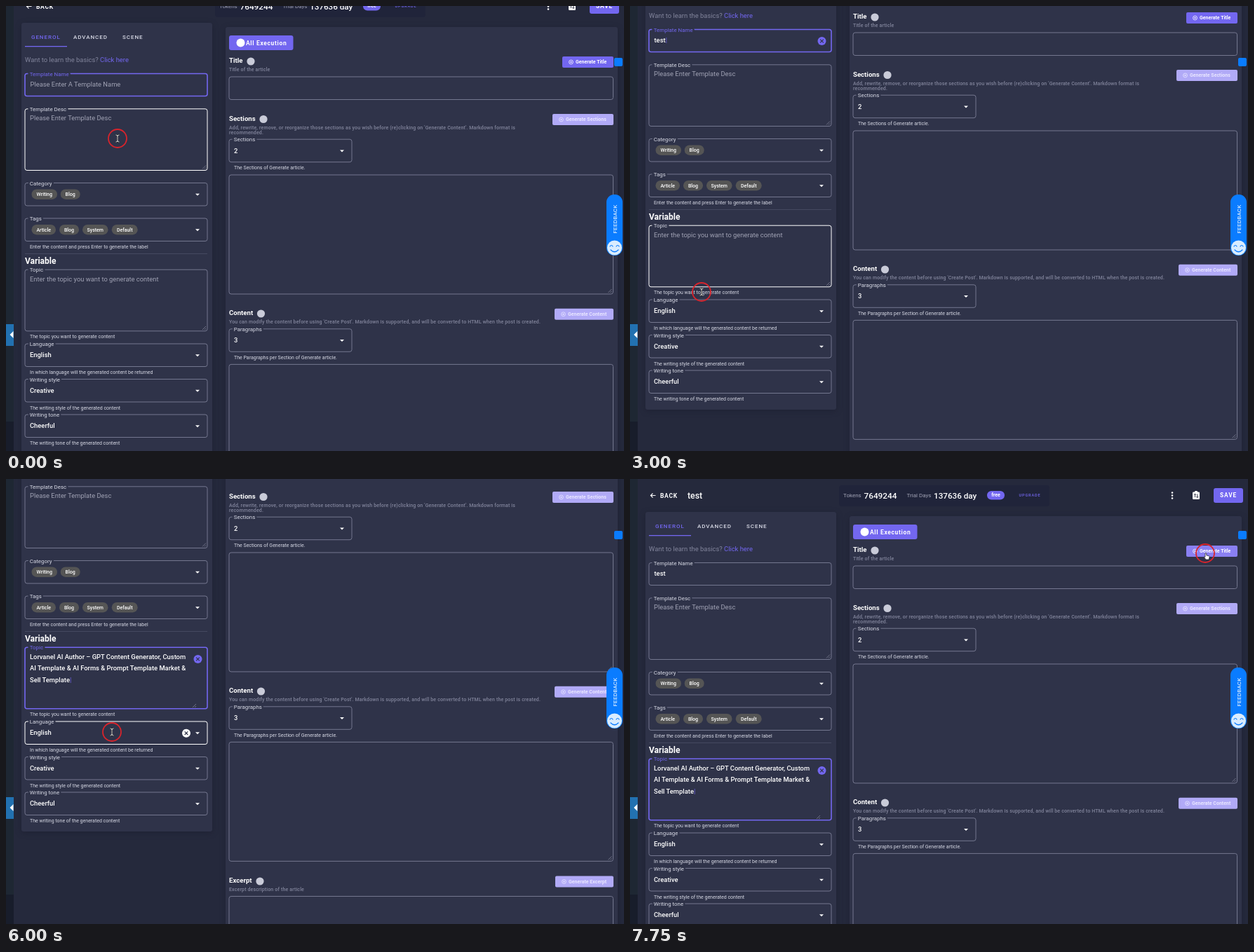
These frames come from a looping animation (881x635 px, 8000 ms). An HTML page:

```html
<!DOCTYPE html>
<html lang="en">
<head>
<meta charset="utf-8">
<title>Template editor</title>
<style>
  html, body { margin: 0; width: 100%; height: 100%; overflow: hidden; background: #25293c; }
  svg { display: block; width: 881px; height: 635px; font-family: Roboto, sans-serif; }
  text { white-space: pre; }
  .label { paint-order: stroke; stroke: #2f3349; stroke-width: 5px; }
  .panel { filter: drop-shadow(0 2px 4px #14172866); }
</style>
</head>
<body>
<svg id="stage" viewBox="0 0 881 635"></svg>
<script>
const LOOP = 8000, STEP = 250;
const PURPLE = '#7367f0', PANEL = '#2f3349', WHITE = '#fff', BORDER = '#74778f';
const MUTED = '#82859c', HINT = '#a0a2b4', PALE = '#d8dae6', BLUE = '#0a7cff';

// Rows of [time, ...values]
const SCROLL = [[0, 23], [500, 0], [2500, 0], [3000, 86], [3500, 159], [6250, 159], [6750, 117], [7250, 0]];
const POINTER = [
  [0, 159, 189], [750, 145, 134], [2000, 145, 134], [2500, 120, 330], [3000, 102, 408],
  [3750, 102, 426], [4000, 118, 280], [4500, 118, 280], [5500, 135, 400], [6000, 151, 361],
  [6750, 259, 345], [7250, 500, 240], [7750, 820, 106]
];

function track(keys, t) {
  const next = keys.findIndex(k => k[0] > t);
  if (next < 0) return keys.at(-1).slice(1);
  const a = keys[next - 1], b = keys[next], p = (t - a[0]) / (b[0] - a[0]);
  return a.slice(1).map((v, i) => v + (b[i + 1] - v) * p);
}

// y is the vertical middle of the capitals
const text = (x, y, s, size, fill = WHITE, weight = 400, spacing = 0, extra = '') =>
  `<text x="${x}" y="${y + size * .355}" font-size="${size}" fill="${fill}" font-weight="${weight}" letter-spacing="${spacing}" ${extra}>${s}</text>`;
const box = (x, y, w, h, fill, r = 0, extra = '') =>
  `<rect x="${x}" y="${y}" width="${w}" height="${h}" rx="${r}" fill="${fill}" ${extra}/>`;
const disc = (x, y, r, fill, extra = '') => `<circle cx="${x}" cy="${y}" r="${r}" fill="${fill}" ${extra}/>`;
const line = (d, stroke = WHITE, width = 1, extra = '') =>
  `<path d="${d}" fill="none" stroke="${stroke}" stroke-width="${width}" ${extra}/>`;
const arrowDown = (x, y) => `<path d="M${x - 3} ${y - 1.2}h6l-3 3z" fill="${WHITE}"/>`;
const clearIcon = (x, y, fill, cross) =>
  disc(x, y, 6, fill) + line(`M${x - 2.3} ${y - 2.3}l4.6 4.6m0 -4.6l-4.6 4.6`, cross, 1.2);
const grip = (x, y) => line(`M${x - 5} ${y}l5 -5M${x - 2} ${y}l2 -2`, '#9a9cb0', .6);
const helper = (x, y, s) => text(x, y, s, 7, PALE);
const value = (x, y, s) => text(x, y, s, 9.4, WHITE, 500);
const hint = (x, y, s) => text(x, y, s, 9.37, HINT);
const caret = `<tspan fill="${PURPLE}" font-weight="400">|</tspan>`;

function field(x, y, w, h, label = '', state = '') {
  const focused = state === 'focus';
  const stroke = focused ? PURPLE : state === 'hover' ? WHITE : BORDER;
  return box(x, y, w, h, 'none', 3, `stroke="${stroke}" stroke-width="${focused ? 1.6 : 1}"`) +
    text(x + 6.8, y + .2, label, 7.9, focused ? PURPLE : PALE, 400, 0, 'class="label"');
}

const area = (...args) => field(...args) + grip(args[0] + args[2] - 2, args[1] + args[3] - 2);
const select = (x, y, w, label, content, state) =>
  field(x, y, w, 32.5, label, state) + value(x + 7, y + 16, content) + arrowDown(x + w - 14, y + 16.5);
const chip = (x, y, w, s) => box(x, y - 7.3, w, 14.6, '#555555', 7.3) +
  text(x + w / 2, y, s, 7, WHITE, 500, 0, 'text-anchor="middle"');

function generateButton(x, y, name, fill = '#b1aaf7') {
  const ink = fill === '#b1aaf7' ? '#e9e6ff' : WHITE;
  return box(x, y - 8, 866 - x, 16, fill, 2) +
    disc(x + 12.5, y, 2.9, 'none', `stroke="${ink}" stroke-width=".8"`) + disc(x + 12.5, y, 1.1, ink) +
    text(x + 19, y, 'Generate ' + name, 7, ink, 700);
}

const heading = (y, s, iconX) => text(318, y, s, 9.6, WHITE, 700) + disc(iconX, y + 1, 5.6, '#c9cbd8');
const note = (y, s) => text(318, y, s, 7, MUTED, 500, .15);

function topBar(name) {
  return line('M36.5 23.5h-7m3 -3l-3 3l3 3', WHITE, 1.1) +
    text(43, 23.5, 'BACK', 8.5, WHITE, 700, .7) + text(82, 23.5, name, 12.3, WHITE, 500) +
    box(298, 9, 300, 30, '#20243a', 4) +
    text(304, 23.5, 'Tokens', 8, HINT) + text(333.5, 23.5, '7649244', 11.8, WHITE, 500) +
    text(394.5, 23.5, 'Trial Days', 8, HINT) + text(433, 23.5, '137636 day', 11.7, WHITE, 500) +
    box(509, 17, 25, 12.5, PURPLE, 6.2) + text(521.5, 23, 'free', 7, WHITE, 700, 0, 'text-anchor="middle"') +
    text(554.5, 23.5, 'UPGRADE', 5.6, PURPLE, 500, .85) +
    [19.5, 23.5, 27.5].map(y => disc(773, y, 1.3, WHITE)).join('') +
    box(802, 18.5, 10, 10.5, WHITE, 1.2) + box(805, 17, 4, 3, WHITE, 1) +
    line('M805.5 26v-5m-1.5 1.5l1.5 -1.5l1.5 1.5M808.8 21.5v5m-1.5 -1.5l1.5 1.5l1.5 -1.5', '#25293c', .9) +
    box(832, 13, 42, 21, PURPLE, 3) + text(841, 23.5, 'SAVE', 8.3, WHITE, 700, .9);
}

function leftPanel(t, name) {
  const filled = t >= 4500, nameFocus = t < 4000;
  const topicState = nameFocus ? (t >= 2750 && t < 3500 ? 'hover' : '') : 'focus';
  const languageHover = t >= 6000 && t < 7000;
  const topic = ['Lorvanel AI Author – GPT Content Generator, Custom',
    'AI Template &amp; AI Forms &amp; Prompt Template Market &amp;', 'Sell Template' + caret];
  return box(22, 47, 272, 615, PANEL, 3, 'class="panel"') +
    text(36, 67, 'GENEROL', 8, PURPLE, 500, .95) + text(96, 67, 'ADVANCED', 8, PALE, 500, .95) +
    text(166, 67, 'SCENE', 8, PALE, 500, .95) + box(27, 80, 60, 1.3, PURPLE) +
    text(27, 100, `Want to learn the basics? <tspan fill="${PURPLE}">Click here</tspan>`, 9.38, MUTED) +

    field(27, 119.5, 260, 32, 'Template Name', nameFocus ? 'focus' : '') +
    (name ? value(34.5, 135, name + (nameFocus ? caret : '')) : hint(34.5, 135, 'Please Enter A Template Name')) +
    (name && nameFocus ? clearIcon(273.5, 136, PURPLE, PANEL) : '') +
    area(27, 169.8, 260, 87.7, 'Template Desc', t < 500 ? 'hover' : '') + hint(34, 183, 'Please Enter Template Desc') +

    select(27, 275.5, 260, 'Category', '') + chip(36.5, 291.7, 36.5, 'Writing') + chip(77.7, 291.7, 28, 'Blog') +
    select(27, 326, 260, 'Tags', '') + chip(36.5, 342.2, 34.5, 'Article') + chip(76, 342.2, 28, 'Blog') +
    chip(109, 342.2, 36.5, 'System') + chip(150.7, 342.2, 37, 'Default') +
    helper(34, 366.7, 'Enter the content and press Enter to generate the label') +
    box(27, 376, 260, .8, '#4b4f66') + text(27, 386.5, 'Variable', 12, WHITE, 700) +

    field(27, 399.2, 260, 87.6, 'Topic', topicState) + grip(filled ? 271 : 285, 485) +
    (filled ? topic.map((s, i) => value(34, 412.5 + i * 16.4, s)).join('') + clearIcon(273.5, 416, PURPLE, PANEL)
      : hint(34, 412.5, 'Enter the topic you want to generate content')) +
    (!filled && !nameFocus ? box(34, 407, .9, 11, PURPLE) : '') +
    helper(34, 495, 'The topic you want to generate content') +

    select(27, 505, 260, 'Language', 'English', languageHover ? 'hover' : '') +
    (languageHover ? clearIcon(257, 521.7, WHITE, PANEL) : '') +
    helper(34, 545.7, 'In which language will the generated content be returned') +
    select(27, 555.5, 260, 'Writing style', 'Creative') +
    helper(34, 596.2, 'The writing style of the generated content') +
    select(27, 606, 260, 'Writing tone', 'Cheerful') +
    helper(34, 647, 'The writing tone of the generated content');
}

function rightPanel(t) {
  return box(313, 53, 559, 900, PANEL, 3, 'class="panel"') +
    box(318, 65, 91.5, 21, PURPLE, 3) + disc(334.5, 75.5, 6, WHITE) +
    text(342, 75.5, 'All Execution', 8.5, WHITE, 700, .65) +

    heading(101, 'Title', 349) + note(114, 'Title of the article') +
    generateButton(793, 103, 'Title', t >= 7750 ? '#8a80f3' : PURPLE) + field(318, 124, 547.5, 32.5) +

    heading(183.5, 'Sections', 367) + generateButton(779, 185, 'Sections') +
    note(196.5, "Add, rewrite, remove, or reorganize those sections as you wish before (re)clicking on 'Generate Content'. Markdown format is") +
    note(203.5, 'recommended.') +
    select(318, 213.2, 175, 'Sections', '2') + helper(325, 254, 'The Sections of Generate article.') +
    area(318, 264, 547.5, 170) +

    heading(461, 'Content', 363.5) + generateButton(782, 462.8, 'Content') +
    note(474, "You can modify the content before using 'Create Post'. Markdown is supported, and will be converted to HTML when the post is created.") +
    select(318, 483.8, 175, 'Paragraphs', '3') + helper(325, 524.5, 'The Paragraphs per Section of Generate article.') +
    area(318, 534.4, 547.5, 170) +

    heading(732, 'Excerpt', 362) + generateButton(783, 733.5, 'Excerpt') +
    note(745, 'Excerpt description of the article') + area(318, 754.5, 547.5, 170);
}

function fixedParts() {
  return box(0, 0, 11, 593, '#1e2733') + box(0, 593, 11, 42, '#181d2b') +
    box(0, 454, 11, 31, '#2271b1') + `<path d="M10.5 464v10l-5 -5z" fill="${WHITE}"/>` +
    box(867, 74, 12, 12, BLUE, 2) +
    box(856, 269, 23, 87, BLUE, 11) +
    text(0, 0, 'FEEDBACK', 8, WHITE, 400, .25, 'text-anchor="middle" transform="translate(867.7 304)rotate(-90)"') +
    disc(867.5, 345, 10.5, '#d9ecff') +
    line('M861 343q2 -3 4 0M870 343q2 -3 4 0M862 348q5.5 5.5 11 0', BLUE, 1.2, 'stroke-linecap="round"');
}

function pointer(t) {
  const [x, y] = track(POINTER, t);
  const beam = `M${x - 2.5} ${y - 5}q2.5 0 2.5 1.5q0 -1.5 2.5 -1.5M${x} ${y - 4}v8M${x - 2.5} ${y + 5}q2.5 0 2.5 -1.5q0 1.5 2.5 1.5`;
  const hand = `<path transform="translate(${x} ${y})" d="M0 0q1 -1 1.8 0v3l3.5 .8q1 .4 .7 1.6l-.8 3.6h-4.2l-2.8 -3.8q.3 -1 1.8 .2z" fill="#fff" stroke="#222" stroke-width=".7"/>`;
  const typing = t >= 1500 && t <= 2000;
  const cursor = typing ? '' : t >= 7750 ? hand : line(beam, '#111', 2) + line(beam, WHITE, .9);
  return disc(x, y, 13, 'none', 'stroke="#d8242c" stroke-width="1.8"') + cursor;
}

function scene(t) {
  const typed = t < 1500 ? 0 : t < 1750 ? 1 : t < 2000 ? 3 : 4;
  const name = 'test'.slice(0, typed);
  const [scroll] = track(SCROLL, t);
  return box(0, 0, 881, 635, '#25293c') +
    `<g transform="translate(0 ${-scroll})">${topBar(name)}${leftPanel(t, name)}${rightPanel(t)}</g>` +
    fixedParts() + pointer(t);
}

const stage = document.getElementById('stage');
const start = performance.now();
let shown = -1;

function frame() {
  const t = Math.floor((performance.now() - start) % LOOP / STEP) * STEP;
  if (t !== shown) stage.innerHTML = scene(shown = t);
  requestAnimationFrame(frame);
}
frame();
</script>
</body>
</html>
```
